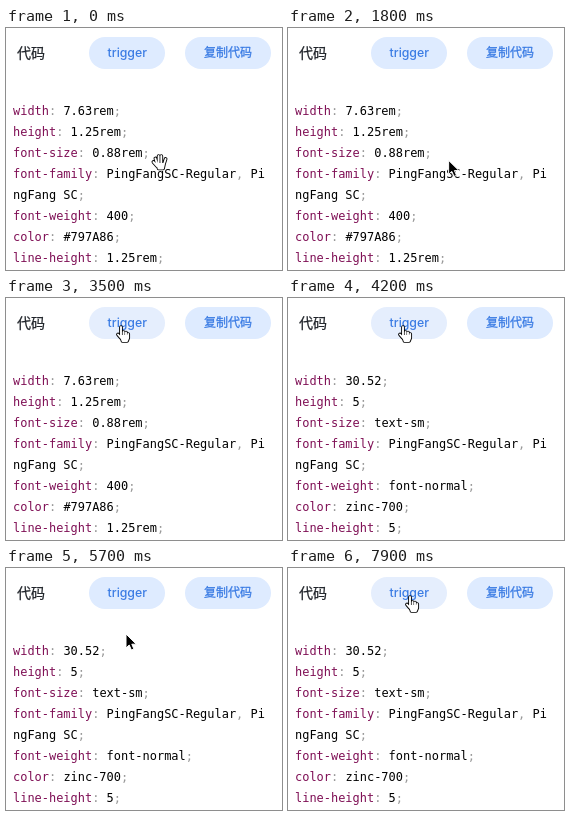
These frames come from a looping animation (276 px wide and 242 px high, 8000 ms). An HTML page:

```html
<!DOCTYPE html>
<html lang="zh">
<head>
<meta charset="utf-8">
<style>
  html, body { margin: 0; width: 100%; height: 100%; overflow: hidden; background: #fff; }
  svg { display: block; }
  text { white-space: pre; }
  .title { font: 500 14px "Noto Sans CJK SC", "Noto Sans CJK", sans-serif; fill: #1f2329; stroke: #1f2329; stroke-width: .25; }
  .pill { fill: #deebff; }
  .pill.hover { fill: #e5eefd; }
  .label { font: 500 12.3px Inter, sans-serif; fill: #3b7ce4; text-anchor: middle; }
  .zh { font: 500 12px "Noto Sans CJK SC", "Noto Sans CJK", sans-serif; stroke: #3b7ce4; stroke-width: .3; }
  .code { font: 11.96px "DejaVu Sans Mono", monospace; fill: #000; }
  .prop { fill: #7f0f55; }
  .punct { fill: #999; }
  .outline, .skin { stroke-linecap: round; stroke-linejoin: round; }
  .outline { fill: #000; stroke: #000; stroke-width: 3.7; }
  .skin { fill: #fff; stroke: #fff; stroke-width: 1.9; }
  .arrow { fill: #000; stroke: #fff; }
</style>
</head>
<body>
<svg width="276" height="242" viewBox="0 0 276 242">
  <defs>
    <path id="pointing" d="M0 1V10M2.6 6V11M5 6.5V11M7.2 8V11M-3 8.5L0 12M0 10H7.2V12L6 15H1.5Z"/>
    <path id="open" d="M-2.6 1.5L-1 7M.6-1V7M3.3-1V7M7.6 2L6 7M-4.6 5L-1 9M-1 7H6L5 11.5H.6Z"/>
  </defs>
  <text class="title" x="11" y="30">代码</text>
  <rect id="trigger" class="pill" x="83" y="9" width="76" height="32" rx="16"/>
  <text class="label" x="121.3" y="29">trigger</text>
  <rect class="pill" x="179" y="9" width="86" height="32" rx="16"/>
  <text class="label zh" x="222" y="29.3">复制代码</text>
  <g id="before" class="code"></g>
  <g id="after" class="code"></g>
  <g id="cursor">
    <path id="arrow" class="arrow" d="M0 0V14L3.2 11 5.4 16 7.9 15 5.8 10.2H10.3Z"/>
    <g id="pointer"><use href="#pointing" class="outline"/><use href="#pointing" class="skin"/></g>
    <g id="grab"><use href="#open" class="outline"/><use href="#open" class="skin"/></g>
  </g>
</svg>
<script>
const LOOP = 8000, STEP = 100, CONVERT_AT = 4100, BUTTON_BOTTOM = 41;
const $ = id => document.getElementById(id);

const span = (cls, text) => `<tspan class="${cls}">${text}</tspan>`;
const shadePunctuation = text => text.replace(/[,;]/g, mark => span("punct", mark));

function codeLines(width, height, size, weight, color, leading) {
  const lines = [
    ["width", width + ";"], ["height", height + ";"], ["font-size", size + ";"],
    ["font-family", "PingFangSC-Regular, Pi"], ["", "ngFang SC;"],
    ["font-weight", weight + ";"], ["color", color + ";"], ["line-height", leading + ";"],
  ];
  return lines.map(([prop, value], i) => {
    const head = prop && span("prop", prop) + span("punct", ":") + " ";
    return `<text x="7" y="${87 + 21 * i}">${head}${shadePunctuation(value)}</text>`;
  }).join("");
}

$("before").innerHTML = codeLines("7.63rem", "1.25rem", "0.88rem", "400", "#797A86", "1.25rem");
$("after").innerHTML = codeLines("30.52", "5", "text-sm", "font-normal", "zinc-700", "5");

const moves = [
  { from: 200, to: 500, x: 162, y: 135 },
  { from: 1700, to: 2600, x: 122, y: 59 },
  { from: 2600, to: 3200, x: 115, y: 28 },
  { from: 4300, to: 5200, x: 115, y: 55 },
  { from: 5200, to: 5500, x: 120, y: 66 },
  { from: 6900, to: 7900, x: 122, y: 28 },
];

function pointerAt(t) {
  let x = 152, y = 129;
  for (const move of moves) {
    const p = Math.min(1, Math.max(0, (t - move.from) / (move.to - move.from)));
    const eased = p * p * (3 - 2 * p);
    x += (move.x - x) * eased;
    y += (move.y - y) * eased;
  }
  return [x, y];
}

const show = (id, visible) => $(id).style.display = visible ? "" : "none";

function draw(now) {
  const t = Math.floor(now % LOOP / STEP) * STEP;
  const [x, y] = pointerAt(t);
  const shape = t < 400 ? "grab" : y < BUTTON_BOTTOM ? "pointer" : "arrow";
  for (const id of ["grab", "pointer", "arrow"]) show(id, id === shape);
  show("before", t < CONVERT_AT);
  show("after", t >= CONVERT_AT);
  $("trigger").classList.toggle("hover", shape === "pointer");
  $("cursor").setAttribute("transform", `translate(${x} ${y})`);
}

const start = performance.now();
function tick() {
  draw(performance.now() - start);
  requestAnimationFrame(tick);
}
tick();
</script>
</body>
</html>
```
